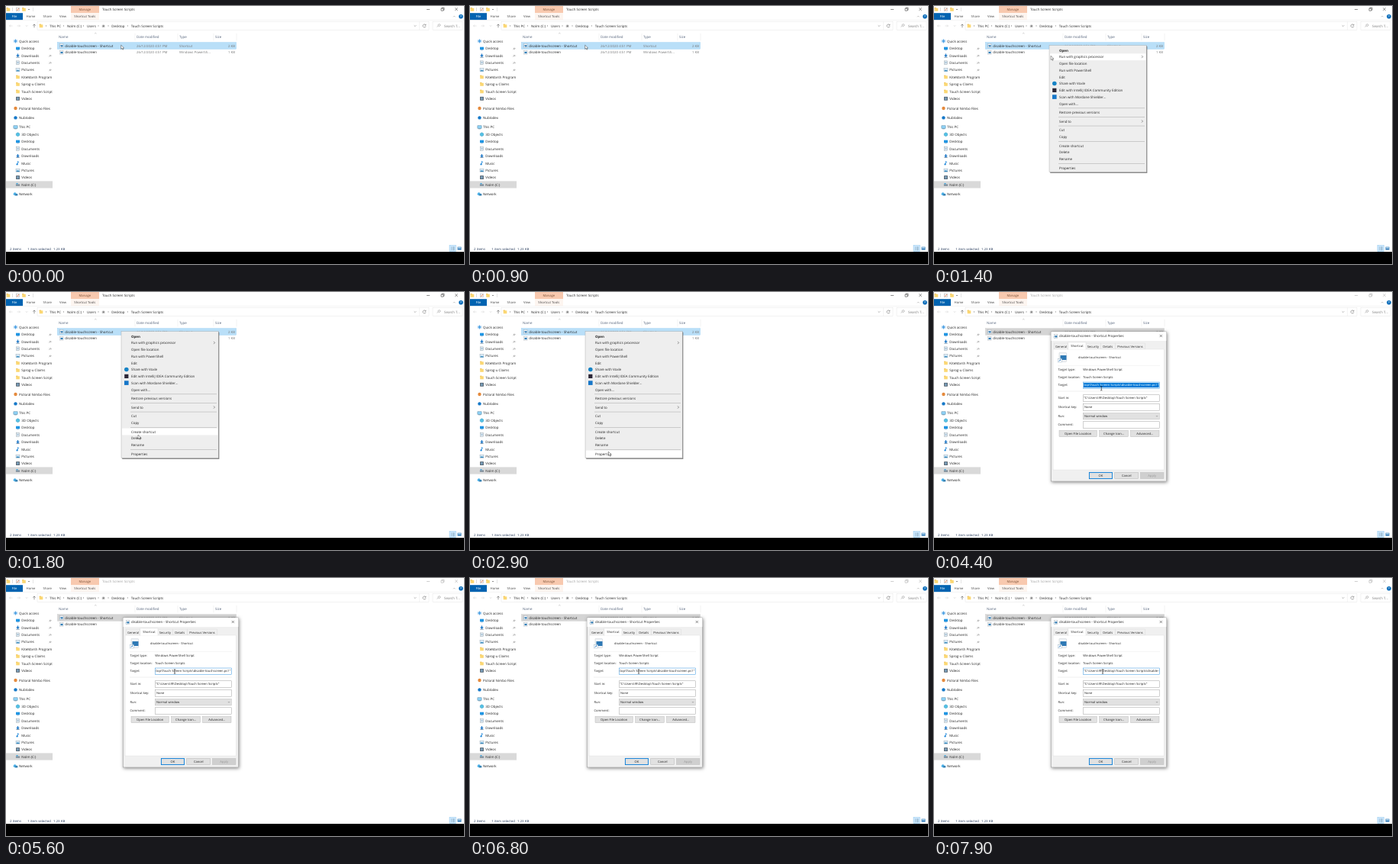
An HTML page that plays this animation: 600 px wide and 338 px high, repeating every 8 s.

```html
<!DOCTYPE html>
<html lang="en">
<head>
<meta charset="utf-8">
<title>Shortcut properties</title>
<style>
html, body { margin: 0; width: 100%; height: 100%; overflow: hidden; background: #fff; }
svg { display: block; width: 100vw; height: 100vh; }
text { font-family: "Open Sans", "Noto Sans", sans-serif; text-rendering: geometricPrecision; white-space: pre; }
</style>
</head>
<body>
<svg id="stage" viewBox="0 0 600 338" preserveAspectRatio="none"></svg>
<script>
const LOOP = 8000;
const MENU_OPEN = 1200, MENU_CLOSE = 3100, DIALOG_OPEN = 3200, DESELECT = 4700;
const INK = '#222', GREY = '#777', BLUE = '#0078d7';

// Drawing helpers; text is placed by its vertical centre.
const rect = (x, y, w, h, fill, stroke = 'none', sw = 0.4) =>
  `<rect x="${x}" y="${y}" width="${w}" height="${h}" fill="${fill}" stroke="${stroke}" stroke-width="${sw}"/>`;
const path = (d, stroke, sw = 0.5, fill = 'none') =>
  `<path d="${d}" stroke="${stroke}" stroke-width="${sw}" fill="${fill}"/>`;
const disc = (x, y, r, fill) => `<circle cx="${x}" cy="${y}" r="${r}" fill="${fill}"/>`;
const text = (x, y, s, { size = 4.45, fill = INK, anchor = 'start', weight = 400 } = {}) =>
  `<text x="${x}" y="${y + size * 0.35}" font-size="${size}" fill="${fill}" text-anchor="${anchor}" font-weight="${weight}">${s}</text>`;
const group = (id, body, attrs = '') => `<g id="${id}" ${attrs}>${body}</g>`;
const chevron = (x, y, color = '#666', r = 1.2) => path(`M${x - r / 2} ${y - r}l${r} ${r}l${-r} ${r}`, color);
const caret = (x, y, color = '#666', r = 1.3) => path(`M${x - r} ${y - r / 2}l${r} ${r}l${r} ${-r}`, color);
const cross = (x, y, color, r = 1.8) => path(`M${x - r} ${y - r}l${2 * r} ${2 * r}m0 ${-2 * r}l${-2 * r} ${2 * r}`, color);

const icons = {
  folder: (x, y) => rect(x - 2.3, y - 2.3, 2.2, 1.5, '#e8b33c') + rect(x - 2.3, y - 1.7, 4.6, 4, '#fbd773'),
  star: (x, y) => path(`M${x - 2.6} ${y}h5.2M${x} ${y - 2.5}v5M${x - 1.7} ${y - 1.7}l3.4 3.4m0 -3.4l-3.4 3.4`, '#3a97e0', 0.9),
  desktop: (x, y) => rect(x - 2.5, y - 2, 5, 3.6, '#2196e3') + rect(x - 1.2, y + 1.9, 2.4, 0.5, '#3974a5'),
  download: (x, y) => path(`M${x} ${y - 2.5}v3.5M${x - 1.7} ${y - 0.6}l1.7 1.8l1.7 -1.8`, '#2079c8', 1.2) + rect(x - 2.2, y + 1.8, 4.4, 0.7, '#4a6f90'),
  page: (x, y) => rect(x - 1.9, y - 2.4, 3.8, 4.8, '#eef4f8', '#758897') + path(`M${x - 1.1} ${y - 0.8}h2.2m-2.2 1.3h2.2`, '#4a80ad'),
  picture: (x, y) => rect(x - 2.5, y - 2, 5, 4, '#dceefa', '#8397a5') + path(`M${x - 2.3} ${y + 1.8}l1.5 -2l1.2 1l1 -.8l1 1.8z`, 'none', 0, '#3187bd'),
  film: (x, y) => rect(x - 2.3, y - 2.4, 4.6, 4.8, '#43505c') + rect(x - 1.2, y - 1.8, 2.4, 3.6, '#7fa7c5'),
  note: (x, y) => path(`M${x - 0.2} ${y + 1.4}v-3.8l1.8 1.2`, '#1683d8', 0.8) + disc(x - 1, y + 1.4, 1.1, '#1683d8'),
  cube: (x, y) => path(`M${x} ${y - 2.5}l2.2 1.2v2.6l-2.2 1.2l-2.2 -1.2v-2.6z`, '#208ab5', 0.4, '#54c2e5'),
  pc: (x, y) => rect(x - 2.6, y - 2, 5.2, 3.5, '#8ed0f4', '#38718f') + rect(x - 1.5, y + 1.9, 3, 0.5, '#38718f'),
  drive: (x, y) => rect(x - 2.6, y - 0.5, 5.2, 2.2, '#7d8c99') + rect(x - 2, y - 2, 2, 1.4, '#35a0dc'),
  net: (x, y) => disc(x - 0.8, y - 0.2, 2, '#4eb1e8') + rect(x - 0.5, y - 0.5, 3.3, 2.5, '#3c85b5'),
  orange: (x, y) => disc(x, y, 2.2, '#e58a3d'),
  blue: (x, y) => disc(x, y, 2.2, '#1678c8'),
  script: (x, y) => rect(x - 2, y - 2.4, 4.3, 4.8, '#f4f6f8', '#a1aab2') + rect(x - 1.2, y - 0.8, 3, 2.2, '#2e7cb6'),
  shortcut: (x, y) => icons.script(x, y) + rect(x - 2.5, y + 0.6, 2, 2, '#fff', '#4b83ab', 0.3)
};

const sidebar = [
  [46, 'star', 'Quick access'], [55.7, 'desktop', 'Desktop', 1], [65, 'download', 'Downloads', 1],
  [74.3, 'page', 'Documents', 1], [83.7, 'picture', 'Pictures', 1], [93, 'folder', 'KiteMarsh Program'],
  [102.5, 'folder', 'Sprog-u Claims'], [112, 'folder', 'Touch Screen Scripts'], [121.3, 'film', 'Videos'],
  [134, 'orange', 'Pictoral Nimbo Files'], [146.4, 'blue', 'Nublodex'], [158.8, 'pc', 'This PC'],
  [168.3, 'cube', '3D Objects'], [177.7, 'desktop', 'Desktop'], [187, 'page', 'Documents'],
  [196.4, 'download', 'Downloads'], [206, 'note', 'Music'], [215.3, 'picture', 'Pictures'],
  [224.6, 'film', 'Videos'], [234, 'drive', 'Nolm (C:)'], [246.5, 'net', 'Network']
];
const topLevel = ['Quick access', 'Pictoral Nimbo Files', 'Nublodex', 'This PC', 'Network'];

function drawSidebar() {
  const rows = sidebar.map(([y, icon, label, pinned]) => {
    const top = topLevel.includes(label);
    return icons[icon](top ? 12.5 : 15.5, y) + text(top ? 17 : 20.3, y, label) +
      (pinned ? path(`M56.5 ${y + 1.5}l1.3 -1.3m-.9 -.9l1.8 1.8m-.6 -2.2l1.5 1.5`, '#777', 0.6) : '');
  }).join('');
  return rect(0, 229.4, 61, 9.2, '#d9d9d9') + group('side', rows, 'clip-path="url(#sideClip)"');
}

function drawRibbon() {
  const tabs = [[32.5, 'Home'], [54.2, 'Share'], [74.5, 'View'], [103.3, 'Shortcut Tools']];
  return rect(85, 0, 37, 9.2, '#f8c9af') + rect(85, 9.2, 37, 9, '#fdf5f0') +
    icons.folder(3, 4.5) + rect(8.6, 2, 0.4, 5, '#aaa') + rect(13.3, 2.2, 4, 4.6, '#fff', '#999') +
    path('M14 4.4l1.1 1.2l1.8 -2.6', '#d45d2c', 0.7) + icons.folder(23.5, 4.5) +
    path('M29 4h2l-1 1.2z', 'none', 0, '#444') + rect(35, 2, 0.4, 5, '#bbb') +
    text(103.3, 4.5, 'Manage', { anchor: 'middle', fill: '#7b5238', size: 4.2 }) +
    rect(0, 9.2, 22, 9, '#0063b1') + text(11, 13.8, 'File', { anchor: 'middle', fill: '#fff', size: 4.2 }) +
    tabs.map(([x, s]) => text(x, 13.8, s, { anchor: 'middle', fill: '#444', size: 4.2 })).join('') +
    path('M586 14.3l1.3 -1.3l1.3 1.3', '#888') + disc(596, 13.7, 2.8, '#0068b8') +
    text(596, 13.7, '?', { anchor: 'middle', fill: '#fff', size: 4, weight: 700 }) +
    rect(0, 18.1, 600, 0.4, '#e2e2e2');
}

function drawTitle() {
  return text(126, 4.5, 'Touch Screen Scripts', { fill: 'currentColor' }) +
    path('M551 4.5h4.2', 'currentColor') + path('M570 3.2h3v3h-3zM571 3.2v-1h3v3h-1', 'currentColor') +
    cross(590, 4.3, 'currentColor');
}

function drawAddress() {
  const crumbs = [[52.5, 57, 'This PC'], [75.5, 80, 'Nolm (C:)'], [101.5, 106, 'Users'], [121, 125.5, 'IR'],
    [134, 138.3, 'Desktop'], [159.3, 163.7, 'Touch Screen Scripts']];
  const arrow = (x, dir) => path(`M${x - 2} 26h4M${x + 2 * dir - 1.5 * dir} 24.5l${1.5 * dir} 1.5l${-1.5 * dir} 1.5`, '#ccc');
  return arrow(6.5, -1) + arrow(16.5, 1) + caret(27, 26, '#aaa', 1) +
    path('M37 28.3v-4.4m-1.7 1.7l1.7 -1.7l1.7 1.7', '#555', 0.6) +
    rect(41, 20.5, 513, 11, 'none', '#dedede') + rect(559, 20.5, 39, 11, 'none', '#dedede') +
    icons.folder(46, 26) + crumbs.map(([c, x, s]) => chevron(c, 26, '#777', 1) + text(x, 26, s)).join('') +
    caret(536, 26) + rect(541.5, 20.5, 0.4, 11, '#e4e4e4') +
    path('M549.6 24.7a2 2 0 1 0 .4 1.8M550 23.7v1.5h-1.5', '#555') +
    path('M564.8 27.5l1.6 -1.6a1.4 1.4 0 1 1 .3 .3', '#777') + text(574, 26, 'Search T...', { fill: GREY });
}

function drawFiles() {
  const heads = [[69, 'Name'], [171, 'Date modified'], [227, 'Type'], [274, 'Size']];
  const file = (y, icon, name, type, size) => icons[icon](72.7, y) + text(77.3, y, name) +
    text(171, y, '26/12/2020 4:51 PM', { fill: GREY, size: 4.35 }) +
    text(227, y, type, { fill: GREY, size: 4.35 }) + text(300, y, size, { fill: GREY, anchor: 'end', size: 4.35 });
  return heads.map(([x, s]) => text(x, 40.3, s, { fill: '#53627a' })).join('') +
    [169, 225, 272, 302].map(x => rect(x - 0.2, 36, 0.4, 9.5, '#e2e2e2')).join('') +
    path('M116 36.3l1.3 -1l1.3 1', '#888', 0.4) +
    rect(67.5, 47.7, 234, 8.6, '#b9dff8', '#8cc8f1').replace('<rect', '<rect id="rowFill"') +
    file(52, 'shortcut', 'disable-touchscreen - Shortcut', 'Shortcut', '2 KB') +
    file(60.7, 'script', 'disable-touchscreen', 'Windows PowerSh...', '1 KB');
}

function drawStatus() {
  const fill = '#2a3f5f';
  return text(5, 318, '2 items', { fill }) + text(28.3, 318, '1 item selected', { fill, size: 4.35 }) +
    text(62, 318, '1.23 KB', { fill, size: 4.35 }) +
    rect(581, 313.7, 8.2, 7.8, '#cce8ff', '#6fb5e3') +
    path('M583 316h1m.8 0h3M583 317.7h1m.8 0h3M583 319.4h1m.8 0h3', '#4b7084') +
    rect(591.5, 315.6, 5, 4, '#3f83bd') + rect(592.2, 316.2, 3.6, 1.3, '#b9dcf2') + rect(0, 322, 600, 16, '#000');
}

const menuItems = [
  [58, 'Open'], [66.7, 'Run with graphics processor'], [75.4, 'Open file location'], [84.2, 'Run with PowerShell'],
  [93, 'Edit'], [101.7, 'Share with Voxle'], [110.4, 'Edit with IntelliJ IDEA Community Edition'],
  [119.2, 'Scan with Mordane Shielder...'], [128, 'Open with...'], [139.6, 'Restore previous versions'],
  [151.2, 'Send to'], [162.6, 'Cut'], [171.4, 'Copy'], [183, 'Create shortcut'], [191.7, 'Delete'],
  [200.5, 'Rename'], [212, 'Properties']
];

function drawMenu() {
  return rect(152.5, 53, 127, 166, '#000').replace('/>', ' opacity=".35"/>') +
    rect(152, 52.5, 127, 166, '#777') + rect(151, 51.7, 127.2, 166, '#eee', '#a0a0a0') +
    rect(152, 0, 125.4, 8.8, '#fff').replace('<rect', '<rect id="hover"') +
    [133.8, 145.4, 157, 177.2, 206.2].map(y => rect(163, y - 0.2, 113, 0.5, '#a5a5a5')).join('') +
    menuItems.map(([y, s], i) => text(164, y, s, { weight: i ? 400 : 700 })).join('') +
    chevron(272.8, 66.5, '#333', 1.6) + chevron(272.8, 151, '#333', 1.6) +
    disc(157.8, 101.5, 2.8, '#1783c5') + rect(155.2, 107.8, 5.2, 5.2, '#2b2636') + rect(155, 116.3, 5.6, 5.6, '#1676c8');
}

const scriptPath = '"C:\\Users\\IR\\Desktop\\Touch Screen Scripts\\disable-touchscreen.ps1"';

function drawDialog() {
  const size = 4.1;
  const label = (x, y, s, o) => text(x, y, s, { size, ...o });
  const button = (x, y, w, h, s, fill = INK, edge = '#adadad', sw) =>
    rect(x, y, w, h, fill === INK ? '#e1e1e1' : '#cfcfcf', edge, sw) +
    label(x + w / 2, y + h / 2, s, { anchor: 'middle', fill });
  const tabs = [[157.5, 18, 'General'], [198.7, 19.5, 'Security'], [218.2, 19, 'Details'], [237.2, 39.5, 'Previous Versions']];
  const labels = [[102, 'Target type:'], [112, 'Target location:'], [122, 'Target:'], [139, 'Start in:'],
    [151, 'Shortcut key:'], [162.7, 'Run:'], [174, 'Comment:']];
  return rect(153.3, 52, 151.2, 196, '#f0f0f0', '#777').replace('/>', ' filter="url(#shadow)"/>') +
    rect(153.5, 52.2, 150.8, 11.8, '#fff') + icons.shortcut(159.5, 58) +
    text(164, 57.8, 'disable-touchscreen - Shortcut Properties', { size: 4.4 }) + cross(297.3, 57.5, '#222', 1.6) +
    tabs.map(([x, w, s]) => rect(x, 67, w, 8, '#f0f0f0', '#d5d5d5') + label(x + w / 2, 71.2, s, { anchor: 'middle' })).join('') +
    rect(156, 75, 145.3, 158, '#fff', '#dcdcdc') + rect(175.7, 66, 23.3, 9.4, '#fff', '#d5d5d5') +
    rect(176, 74.5, 22.7, 1.2, '#fff') + label(187.5, 70.7, 'Shortcut', { anchor: 'middle' }) +
    rect(164, 79.8, 9.3, 11.7, '#f3f5f7', '#b6bdc4') + rect(165.5, 83, 8, 6, '#2e79b5') + rect(162.7, 87.3, 4.7, 4.7, '#fff', '#8caabf') +
    path('M163.8 91q0 -2 2.2 -2m-.9 -.9l.9 .9l-.9 .9', '#1670c0', 0.6) +
    label(189, 85.2, 'disable-touchscreen - Shortcut', { size: 3.95 }) +
    rect(162, 96, 134, 0.4, '#e6e6e6') + rect(162, 129.8, 134, 0.4, '#d4d4d4') +
    labels.map(([y, s]) => label(162.5, y, s)).join('') +
    label(195.3, 102, 'Windows PowerShell Script') + label(195.3, 112, 'Touch Screen Scripts') +
    rect(195.2, 118, 100, 8.4, '#fff', BLUE) + rect(196, 119, 98.6, 6.2, BLUE).replace('<rect', '<rect id="selection"') +
    `<g clip-path="url(#fieldClip)">${group('target', label(0, 121.9, scriptPath, { size: 4.15, fill: 'currentColor' }))}</g>` +
    [134.8, 146.7, 169.8].map(y => rect(195.2, y, 100, 8.5, '#fff', '#8a8a8a')).join('') +
    label(196, 138.8, '"C:\\Users\\IR\\Desktop\\Touch Screen Scripts"', { size: 4.15 }) + label(197, 150.8, 'None') +
    rect(195.2, 158.5, 100, 8.4, '#e1e1e1', '#adadad') + label(197, 162.7, 'Normal window') + caret(292, 162.7, '#555', 1) +
    button(164, 181.4, 49.3, 8.2, 'Open File Location') + button(216.7, 181.4, 37.6, 8.2, 'Change Icon...') +
    button(257.7, 181.4, 37.3, 8.2, 'Advanced...') + button(203.4, 236.4, 30, 8.2, 'OK', INK, BLUE, 0.9) +
    button(236.8, 236.2, 31, 8.5, 'Cancel') + button(270.3, 236.2, 30.7, 8.5, 'Apply', '#999', '#bfbfbf');
}

const stage = document.getElementById('stage');
stage.innerHTML = `<defs>
  <clipPath id="sideClip"><rect x="0" y="36" width="61" height="230"/></clipPath>
  <clipPath id="fieldClip"><rect x="195.6" y="118" width="99.2" height="8.4"/></clipPath>
  <filter id="shadow" x="-10%" y="-10%" width="120%" height="120%">
    <feDropShadow dx="0.8" dy="1.2" stdDeviation="2" flood-opacity=".5"/></filter></defs>` +
  rect(0, 0, 600, 338, '#fff') + drawRibbon() + group('title', drawTitle()) + drawAddress() + drawSidebar() +
  drawFiles() + drawStatus() + group('menu', drawMenu()) + group('dialog', drawDialog()) +
  group('arrow', path('M0 0v5.3l1.3 -1.2l.9 2l.9 -.4l-.9 -1.9h1.7z', '#111', 0.4, '#fff')) +
  group('beam', path('M-1.1 -2.8q1.1 0 1.1 .7v4.2q0 .7 -1.1 .7M1.1 -2.8q-1.1 0 -1.1 .7M0 2.1q0 .7 1.1 .7', '#111', 0.6));

const el = Object.fromEntries([...stage.querySelectorAll('[id]')].map(node => [node.id, node]));
const show = (node, on) => node.setAttribute('visibility', on ? 'visible' : 'hidden');
const moveTo = (node, x, y) => node.setAttribute('transform', `translate(${x} ${y})`);

const pointerSteps = [[0, 150.7, 51.2], [1300, 150.7, 51.2], [1800, 173, 187.2], [2000, 173, 187.2],
  [2700, 181.3, 209.2], [3700, 181.3, 209.2], [4500, 221, 122.2], [LOOP, 221, 122.2]];

function pointerAt(t) {
  const i = pointerSteps.findIndex(step => step[0] > t);
  const [t0, x0, y0] = pointerSteps[i - 1], [t1, x1, y1] = pointerSteps[i];
  const p = (t - t0) / (t1 - t0), e = p * p * (3 - 2 * p);
  return [x0 + (x1 - x0) * e, y0 + (y1 - y0) * e];
}

// The field scrolls back by a quarter of its width each time the caret passes its left edge.
function fieldX(t, textWidth) {
  const end = 294.3 - textWidth, step = t < 7400 ? 0 : t < 7700 ? 1 : 2;
  return Math.min(196, end + step * 25);
}

function render(t) {
  const [x, y] = pointerAt(t);
  const menuOn = t >= MENU_OPEN && t < MENU_CLOSE, dialogOn = t >= DIALOG_OPEN;
  const selected = t < DESELECT;
  const overField = dialogOn && x > 195 && y > 118 && y < 126.5;
  show(el.menu, menuOn);
  show(el.dialog, dialogOn);
  const item = menuOn && x > 152 && menuItems.find(([cy]) => Math.abs(cy - y) <= 4.4);
  show(el.hover, Boolean(item));
  if (item) el.hover.setAttribute('y', item[0] - 4.4);
  el.title.style.color = dialogOn ? '#a0a0a0' : '#222';
  el.rowFill.setAttribute('fill', dialogOn ? '#d4d4d4' : '#b9dff8');
  el.rowFill.setAttribute('stroke', dialogOn ? '#c8c8c8' : '#8cc8f1');
  show(el.selection, dialogOn && selected);
  el.target.style.color = selected ? '#fff' : INK;
  moveTo(el.target, fieldX(t, el.target.firstChild.getComputedTextLength()), 0);
  show(el.arrow, !overField);
  show(el.beam, overField);
  moveTo(el.arrow, x, y);
  moveTo(el.beam, x, y + 0.3);
}

const start = performance.now();
function tick() {
  const t = (performance.now() - start) % LOOP;
  render(Math.floor(t / 100) * 100);
  requestAnimationFrame(tick);
}
tick();
</script>
</body>
</html>
```
